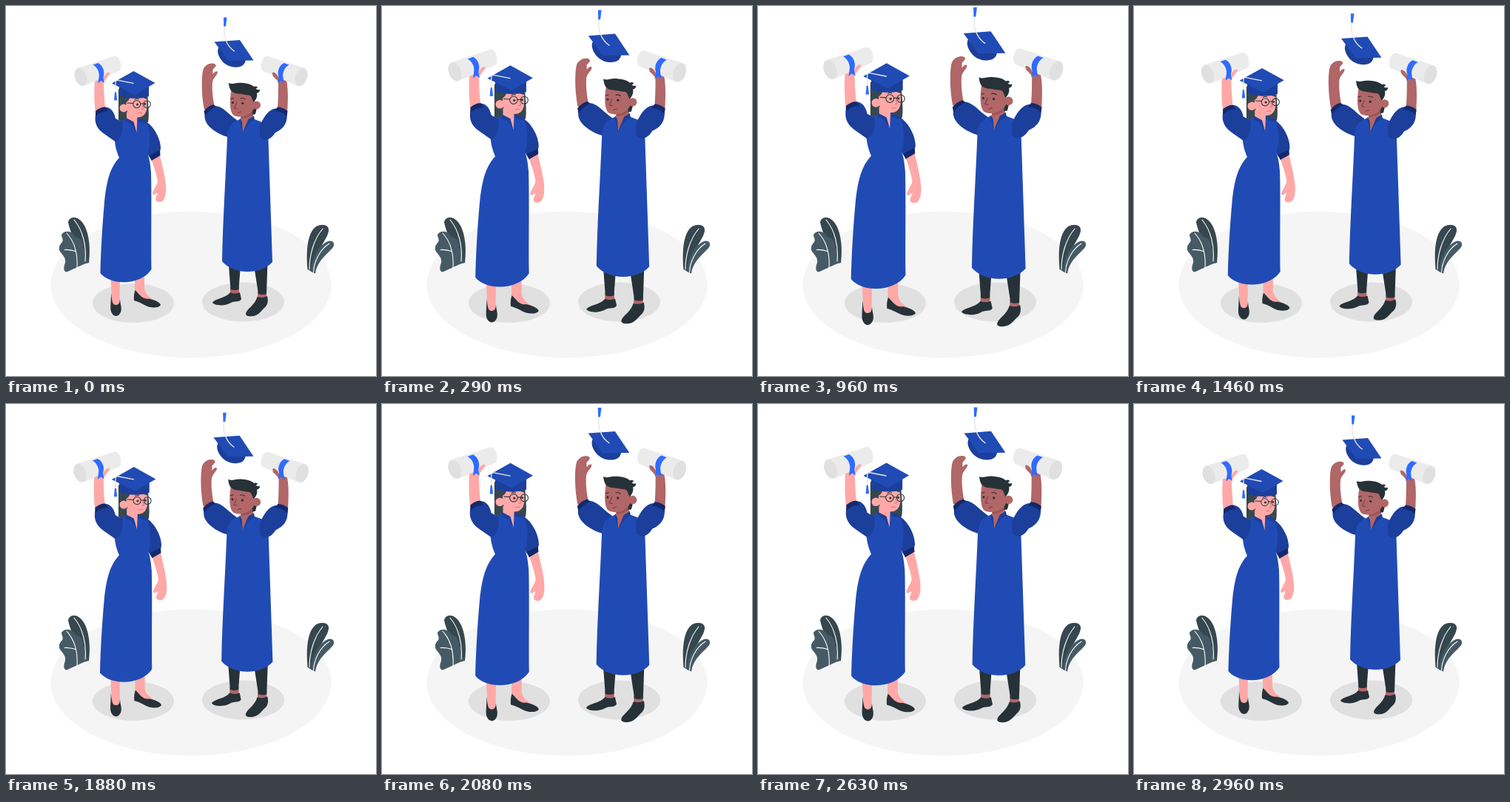
An HTML page for the animation above (3000 ms loop, 500 by 500 pixels).

```html
<!DOCTYPE html>
<html lang="en">
<head>
<meta charset="utf-8">
<title>Graduates</title>
<style>
html, body { margin: 0; height: 100%; overflow: hidden; background: #fff; }
svg { display: block; width: 100%; height: 100%; }
.gown { fill: #214bb4; }
.sleeve { fill: #1c3f9b; }
.cuff { fill: #13296d; }
.ribbon { fill: #2f6bff; }
.dark { fill: #263238; }
.slate { fill: #37474f; }
.leaf { fill: #455a64; }
.light { fill: #ffa8a7; }
.brown { fill: #b16668; }
.shade { fill: #9a5355; }
.line { fill: none; stroke-linecap: round; stroke-linejoin: round; }
.vein { stroke: #fff; stroke-width: 1.1; }
.cord { stroke: #e6e6e6; stroke-width: 1.3; }
.ink { stroke: #263238; stroke-width: 1; }
</style>
</head>
<body>
<svg viewBox="0 0 500 500">
  <defs>
    <g id="scroll">
      <path fill="#ebebeb" d="M96 84 L147 67.500 C154 67 158 82 153.500 87.500 L106 108z"/>
      <ellipse cx="101" cy="96" rx="8" ry="12.600" transform="rotate(-20 101 96)" fill="#e0e0e0"/>
      <path class="ribbon" d="M117.500 79.500 L124.500 77 C131 80 134 89 131.500 95.500 L126 98 C126.500 90 124 83 117.500 79.500z"/>
      <path class="ribbon" d="M126 93 L124.500 104.500 L128.500 101 L133 104 L131 92z"/>
    </g>
  </defs>

  <ellipse cx="250" cy="376.500" rx="189.500" ry="99" fill="#f5f5f5"/>
  <ellipse cx="172" cy="401.500" rx="55" ry="26.500" fill="#e0e0e0"/>
  <ellipse cx="320.500" cy="400" rx="55.500" ry="26.500" fill="#e0e0e0"/>

  <!-- plants -->
  <path class="slate" d="M84 292 C86 284 95 284 101 290 C111 300 115 322 112 347 L98 350 C99 325 87 309 84 292z"/>
  <path class="leaf" d="M75 309 C79 302 90 304 94 312 C101 313 105 319 104 326 C109 332 106 338 111.500 346 L82 359.500 C77 359 78 352 80 347 C81 341 78 338 74 333 C70 328 72 323 76 319 C78 315 75 313 75 309z"/>
  <path class="line vein" d="M92 289 C104 303 109 325 107 345 M82 307 C94 320 97 338 96 354 M79 329.500 Q87 329 94 331.500"/>
  <path class="slate" d="M407.500 356 C405 328 408 303 421 297 C429 294 437 296 436 304 C434 316 420 328 413 359z"/>
  <path class="leaf" d="M412 359 C412 342 424 322 435 318 C442 316 445 321 442 326 C435 335 421 343 418 361.500z"/>
  <path class="line vein" d="M428 301 C416 315 410 336 410 356 M437 321 C425 328 416 345 415.500 360"/>

  <g id="girl">
    <path class="slate" d="M152 112 V154 Q156 158 166 157 L192 157 C194 148 192 130 191 118z"/>
    <path class="light" d="M141 362 L143.500 404 H153.500 L154 362z M174 360 V386 L188 399 L201 398 Q188 391 187 382 V358z"/>
    <path class="dark" d="M142 388 C142 400 140.500 408 142 413 C145 421 153 421 155.500 412 C156.500 406 154.500 404 154 396 C153.500 399 153.800 404 148.500 404 C143.500 404 143.500 399 142 388z"/>
    <path class="dark" d="M174.500 384 C180 389 184 397 193 395.500 C200 397 208 400 209 404 C206 409 194 408 188 404.500 C182 401 177 399 173 398 C172.500 393 173 388 174.500 384z"/>

    <path class="light" d="M196 206 L208 202 C211 215 215 230 216 243 C217 255 214 264 209 264.500 C204 266 200 262 203.500 257 L205 252 C202 254 199 257 198 253.500 C199 248 204 243 205 237 C203 225 199 215 196 206z"/>
    <path class="light" d="M121 144 C119 130 119 112 120 98 L131 96 L137 89 Q142 88 139 93 L132 102 C132 116 133 128 134.500 142z"/>
    <use href="#scroll"/>
    <path class="light" d="M131.500 97 C133 93 136 90 139 89.500 Q142 91 138 94.500 L132.500 102z"/>

    <path class="sleeve" d="M189 156 C200 163 209 179 209 193 L207 200 L195 206 L190 198z"/>
    <path class="cuff" d="M193.500 202 L208 195 L208.500 202 L196.500 209z"/>
    <path class="gown" d="M162 152 L153 157 C146 168 144 184 153 205 C141 218 136 235 133 265 C130 298 128 335 127.500 361 C141 378 182 378 196.500 356 C196 310 197 260 196 225 C195 213 194 207 191.500 200 C195 188 196 172 190 157 L178 152z"/>
    <path class="sleeve" d="M121.500 145 C118 158 124 167 133 173 L148 183.500 C156 180 158 170 157.500 157 L148 152 C146 142 140 136 133 137z"/>
    <path class="cuff" d="M121 149 L121 142 Q128 136 134.500 136.500 L138 142 Q128 142 121 149z"/>
    <path class="light" d="M163 143 V153 L171 157 L176.500 171 L177.500 148z"/>
    <path class="sleeve" d="M162 151 L172.500 156.500 L176.500 171 L169 159.500 L161 156z M177.500 151 L191 156 L191 159 L178 156z"/>

    <path class="light" d="M163 125 C161 140 164 149 174 150 C184 152 190 147 190.500 136 L190 119 L166 119z"/>
    <circle class="light" cx="159" cy="138" r="5.500"/>
    <path class="slate" d="M152 114 V135 C160 131 166 130 167 124 Q178 121 191 126 L192 114z"/>
    <g class="line ink">
      <circle cx="176.700" cy="132.700" r="5"/>
      <circle cx="190.500" cy="132.700" r="4.800"/>
      <path d="M171.700 131.500 L164 131 M181.700 132 H185.700 M174 126.500 Q177 124.500 179 126"/>
    </g>
    <circle class="dark" cx="177.500" cy="133" r="1.500"/>
    <circle class="dark" cx="187.800" cy="132.500" r="1.400"/>
    <path class="line" stroke="#dd7577" d="M184 134 L186 139 L183 139.500 M179 145 Q182 143.500 184 145"/>

    <path class="sleeve" d="M153 108 V121 C164 126 183 126 193 122 V107z"/>
    <path class="gown" d="M143 104.500 L172.500 88 L201.500 104 L174 120z"/>
    <path class="line cord" d="M172 104.500 L150 100.200 Q148 101 148 104 V117"/>
    <path class="ribbon" d="M147 116.500 H149 L150.300 127.500 H146z"/>
  </g>

  <g id="boy">
    <path class="brown" d="M303 379 H315 V392 H303z M340 385 H352 V396 H340z"/>
    <path class="dark" d="M301 350 L303.500 383 Q309 385 314.500 383 L317 350z M335 350 L341 389 Q347 391 352 389 L353.500 346z"/>
    <path class="dark" d="M279 400.500 C283 395 297 395 303 387 Q309 390 316 387 L318 396 C316 401 308 398 303 401.500 C295 406 281 405 279 400.500z"/>
    <path class="dark" d="M324 416 C325 409 336 405 339.500 393 Q347 395.500 353 392 C355 400 353 405 349 408 C345 412 341 418 334 419 C328 420 324 418.500 324 416z"/>

    <path class="brown" d="M268 140 C264 120 264 95 266.500 86 C269 79 278 75.500 283 79 C285 81 282 83 279.500 86 L279.500 92 C282 89 285 87 286 89.500 C286 93 280 97 279 103 C278 115 280 126 282 138z"/>
    <path class="brown" d="M366.500 143 C368 130 368 114 368 102 L360 94 Q360 88 365 90 L378 96 C382 110 381 130 380 146z"/>
    <use href="#scroll" transform="matrix(-1 0 0 1 500 0)"/>
    <path class="brown" d="M368.500 97 C367 93 364 90 361 89.500 Q358 91 362 94.500 L367.500 102z"/>

    <path class="sleeve" d="M269 145 C270 138 276 135 283 135 C294 136 300 146 312 154 L304 178 C288 175 269 163 268.500 150z"/>
    <path class="cuff" d="M269 149 L267.500 142 Q273 135 280.500 133 L284 136 Q274 140 269 149z"/>
    <path class="gown" d="M299 178 C299 165 303 158 316 153 L333 152 L346 157 L354.500 180 L360 346 C345 363 308 364 292 345 C293 290 297 230 299 178z"/>
    <path class="sleeve" d="M343 162 C349 148 357 136 370 138.500 L379.500 145 C381 160 373 167 364 171 C358 181 349 184 343 177z"/>
    <path class="cuff" d="M363 141.500 L367 136.500 Q375 137 380.500 142 L379.500 149 Q373 142 363 141.500z"/>
    <path class="brown" d="M318 143 L317 154 L320 171 L327 155 L334 151 V138z"/>
    <path class="shade" d="M318 147 C325 148 331 144 334 139 V145 C330 150 323 152 317.500 152z"/>
    <path class="sleeve" d="M316 151 L319 157 L320 171 L316 157z M335 148.500 L327.500 153 L320 171 L329 158 L336 154z"/>
    <path class="dark" d="M333 138 L339 138 L337 146 L333 147z"/>

    <circle class="brown" cx="338.500" cy="134" r="5.500"/>
    <path class="brown" d="M304.500 113 C302 128 302 144 308 148 C316 152 330 149 335 139 L336 115z"/>
    <path class="dark" d="M301 104 C306 107 310 102.500 320 104 C328 104.500 333 107 335 109 Q339 107.500 340 110 L337.500 112 Q341 114 343 112.500 Q343 117 339 117.500 C340 122 338 127 334.500 130 L332 124 C331 119 326 121 318 119 C309 118 302 118 301 104z"/>
    <circle class="dark" cx="306.500" cy="130.500" r="1.500"/>
    <circle class="dark" cx="319.700" cy="131.500" r="1.600"/>
    <path class="line ink" d="M304 125.500 L307.500 124.500 M317 125 Q320 123.500 323 126"/>
    <path class="line" stroke="#7c3c3e" d="M312 130 L308.500 138 L312.500 138.500 M313.500 144.500 Q316 142.500 318 143"/>

    <path class="sleeve" d="M288 55 C284.500 60 286.500 67 291 73 C296 80 305 83.500 313 82.500 C320 82 323.500 78 324 72z"/>
    <path class="gown" d="M281.500 48.500 L316 46 L334.500 73.500 L300.500 74z"/>
    <path class="line cord" d="M308.500 61 C298 54 293 40 295.500 27"/>
    <path class="ribbon" d="M294 15.500 H298.500 L297 27.500 H294.300z"/>
  </g>
</svg>
<script>
const LOOP = 3000, BEAT = 2950;
const people = [["girl", 153.5, 243], ["boy", 336.5, 217]]
  .map(([id, x, y]) => [document.getElementById(id), x, y]);

// Two linear beats: quick swell and slow fall, then an even swell and fall.
function swell(p) {
  if (p < .2) return p / .2;
  if (p < .6) return (.6 - p) / .4;
  return Math.max(0, 1 - Math.abs(p - .8) / .2);
}

function draw(now) {
  const s = 1 + .1 * swell(now % LOOP / BEAT);
  for (const [el, x, y] of people)
    el.setAttribute("transform", `translate(${x} ${y}) scale(${s}) translate(${-x} ${-y})`);
}

const start = performance.now();
function tick() {
  draw(performance.now() - start);
  requestAnimationFrame(tick);
}
tick();
</script>
</body>
</html>
```
